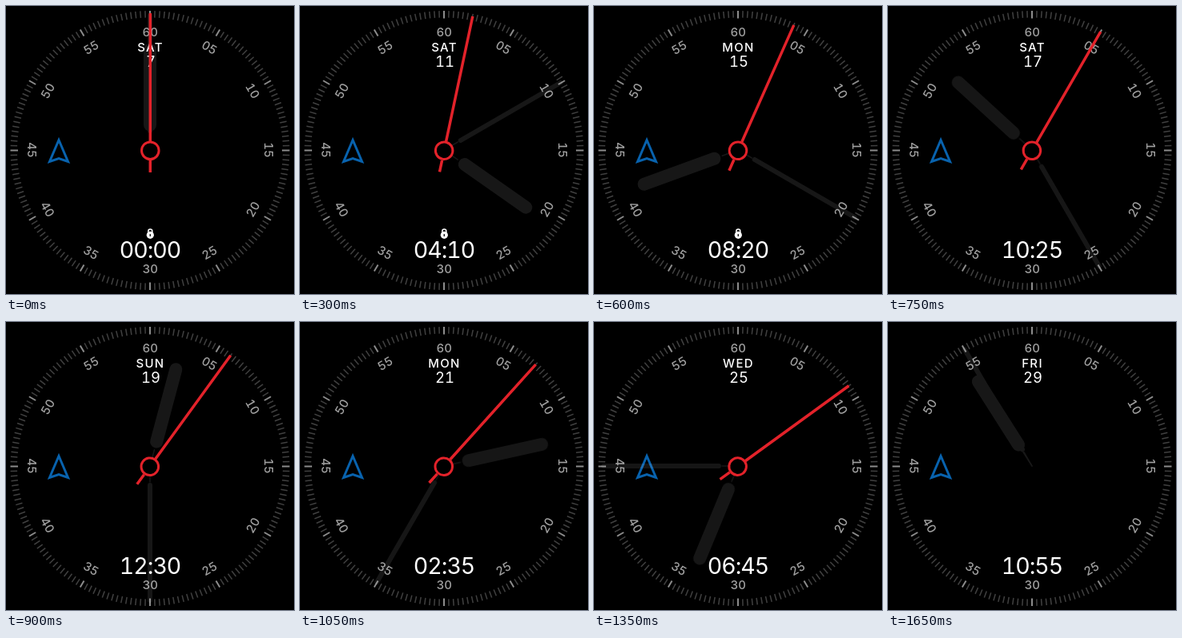
These frames come from a looping animation (360x360 px, 1800 ms). An HTML page:

```html
<!DOCTYPE html>
<html lang="en">
<head>
<meta charset="utf-8">
<title>Watch face</title>
<style>
  html, body { margin: 0; height: 100%; overflow: hidden; background: #000; }
  svg { display: block; width: 100vw; height: 100vh; }
  text {
    text-anchor: middle; fill: #fff;
    font-family: Inter, sans-serif; font-variant-numeric: tabular-nums;
  }
  #dial text { font-size: 15px; font-weight: 500; fill: #a0a0a0; }
  #day { font-size: 15px; font-weight: 500; letter-spacing: 1.3px; }
  #date { font-size: 18.5px; }
  #time { font-size: 28.5px; letter-spacing: -1px; }
  #hands { stroke: #fff; stroke-linecap: round; opacity: .09; }
  #second { stroke: #e3222a; stroke-width: 3.5; }
</style>
</head>
<body>
<svg viewBox="0 0 360 360">
  <g id="dial"></g>
  <path d="M66 167.500 L54.500 194.500 L66 190.500 L77.500 194.500 Z" fill="none" stroke="#0862ad" stroke-width="3"/>
  <g id="hands">
    <g id="hour">
      <path d="M180 180V159" stroke-width="1.500"/>
      <path d="M180 148.500V55" stroke-width="16"/>
    </g>
    <g id="minute">
      <path d="M180 180V160" stroke-width="1.500"/>
      <path d="M180 156V12" stroke-width="6"/>
    </g>
  </g>
  <text id="day" x="180.500" y="57"></text>
  <text id="date" x="181" y="75.500"></text>
  <text id="time" x="180" y="315"></text>
  <g id="lock">
    <path d="M177.800 284V281.500a2.500 2.500 0 0 1 5 0V284" fill="none" stroke="#fff" stroke-width="1.500"/>
    <circle cx="180.300" cy="286.300" r="4.600" fill="#fff"/>
    <path d="M180.300 285V288" stroke="#222" stroke-width="1.600"/>
  </g>
  <g id="second">
    <path d="M180.300 169V9M180.300 193V208"/>
    <circle cx="180.300" cy="180.700" r="10.800" stroke-width="3"/>
  </g>
</svg>
<script>
  const STEP = 150, STEPS = 12;
  const DAYS = "SAT SUN SAT SUN MON SAT SUN MON TUE WED THU FRI".split(" ");
  const el = id => document.getElementById(id);
  const two = n => String(n).padStart(2, "0");

  function add(tag, attrs, text = "") {
    const node = document.createElementNS("http://www.w3.org/2000/svg", tag);
    for (const key in attrs) node.setAttribute(key, attrs[key]);
    node.textContent = text;
    el("dial").append(node);
  }

  function buildDial() {
    for (let i = 0; i < 180; i++) {
      const major = i % 15 === 0;
      add("path", {
        d: `M180 6V${major ? 15.5 : 14.5}`,
        stroke: major ? "#8c8c8c" : "#404040",
        "stroke-width": major ? 2 : 1.5,
        transform: `rotate(${i * 2} 180 180.5)`
      });
    }
    for (let n = 5; n <= 60; n += 5) {
      const deg = n * 6, a = deg * Math.PI / 180;
      const x = 180.3 + 148 * Math.sin(a), y = 180 - 148 * Math.cos(a);
      // Lower labels are turned over so they stay readable
      const turn = n > 15 && n <= 45 ? deg - 180 : deg;
      add("text", { y: 5.5, transform: `translate(${x} ${y}) rotate(${turn})` }, two(n));
    }
  }

  const rotate = (id, deg) => el(id).setAttribute("transform", `rotate(${deg} 180 180)`);
  const show = (id, on) => el(id).setAttribute("visibility", on ? "visible" : "hidden");

  function draw(i) {
    const hour = i > 6 ? 2 * i - 12 : 2 * i;
    rotate("hour", i * 62.5);
    rotate("minute", i * 30);
    rotate("second", i * 6);
    show("second", i < 10);
    show("lock", i < 5);
    el("day").textContent = DAYS[i];
    el("date").textContent = 7 + 2 * i;
    el("time").textContent = `${two(hour)}:${two(5 * i)}`;
  }

  let last = -1;
  function tick() {
    const i = Math.floor(performance.now() / STEP) % STEPS;
    if (i !== last) draw(last = i);
    requestAnimationFrame(tick);
  }

  buildDial();
  tick();
</script>
</body>
</html>
```
